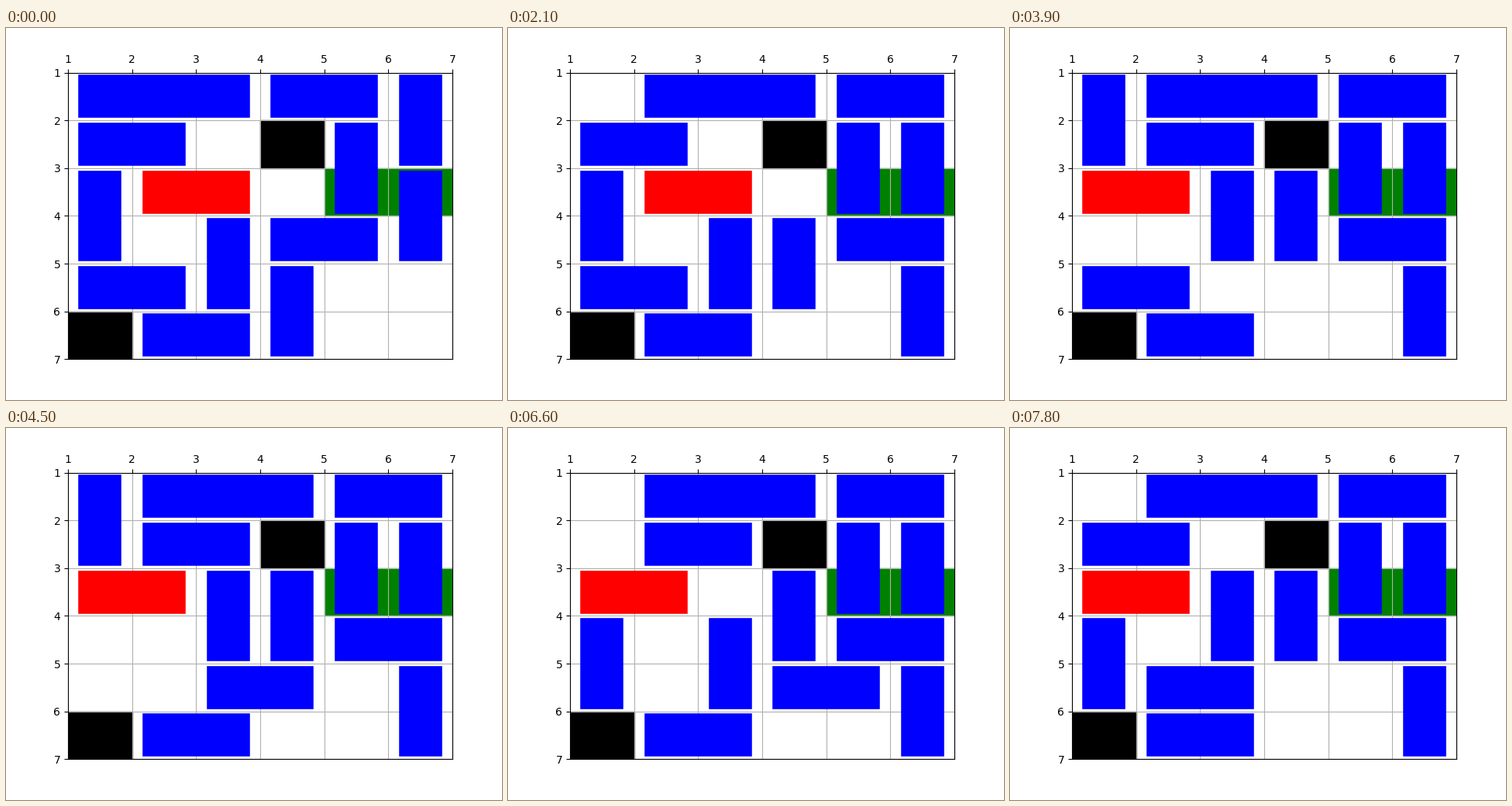
A matplotlib script for the animation above (8000 ms loop, 640 by 480 pixels).

```python
import matplotlib.pyplot as plt
from matplotlib.animation import FuncAnimation
from matplotlib.patches import Rectangle

FRAME_MS = 100
FRAMES = 80
FRAMES_PER_MOVE = 3

# name: (column, row, length, is horizontal)
BLOCKS = {
    "A": (1, 1, 3, True),
    "B": (4, 1, 2, True),
    "C": (6, 1, 2, False),
    "D": (1, 2, 2, True),
    "E": (5, 2, 2, False),
    "F": (1, 3, 2, False),
    "G": (6, 3, 2, False),
    "H": (4, 4, 2, True),
    "I": (3, 4, 2, False),
    "J": (1, 5, 2, True),
    "K": (4, 5, 2, False),
    "L": (2, 6, 2, True),
    "R": (2, 3, 2, True),
}

# Each move slides one block a single cell along its own axis.
MOVES = ("G+ G+ C+ B+ A+ H+ K- D+ F- F- R- I- K- "
         "J+ J+ J+ I+ R+ F+ F+ F+ R- I- J- J- D-").split()


def shift_after(name, count):
    done = MOVES[:count]
    return done.count(name + "+") - done.count(name + "-")


def centre_line(name, shift):
    """End points of the line through the centres of a block's cells."""
    col, row, length, horizontal = BLOCKS[name]
    x, y = col + 0.5, row + 0.5
    if horizontal:
        return [x + shift, x + shift + length - 1], [y, y]
    return [x, x], [y + shift, y + shift + length - 1]


fig, ax = plt.subplots(figsize=(6.4, 4.8), dpi=100)
ax.set_xlim(1, 7)
ax.set_ylim(7, 1)
ax.set_xticks(range(1, 8))
ax.set_yticks(range(1, 8))
ax.xaxis.tick_top()
ax.grid(True)

for col, row, color in [(4, 2, "black"), (1, 6, "black"),
                        (5, 3, "green"), (6, 3, "green")]:
    ax.add_patch(Rectangle((col, row), 1, 1, color=color))

lines = {}
for name in BLOCKS:
    color = "red" if name == "R" else "blue"
    lines[name], = ax.plot(*centre_line(name, 0), color=color, linewidth=40,
                           solid_capstyle="projecting")


def update(frame):
    count = frame // FRAMES_PER_MOVE
    for name, line in lines.items():
        line.set_data(*centre_line(name, shift_after(name, count)))
    return list(lines.values())


anim = FuncAnimation(fig, update, frames=FRAMES, interval=FRAME_MS,
                     repeat=True, repeat_delay=0)
plt.show()
```
